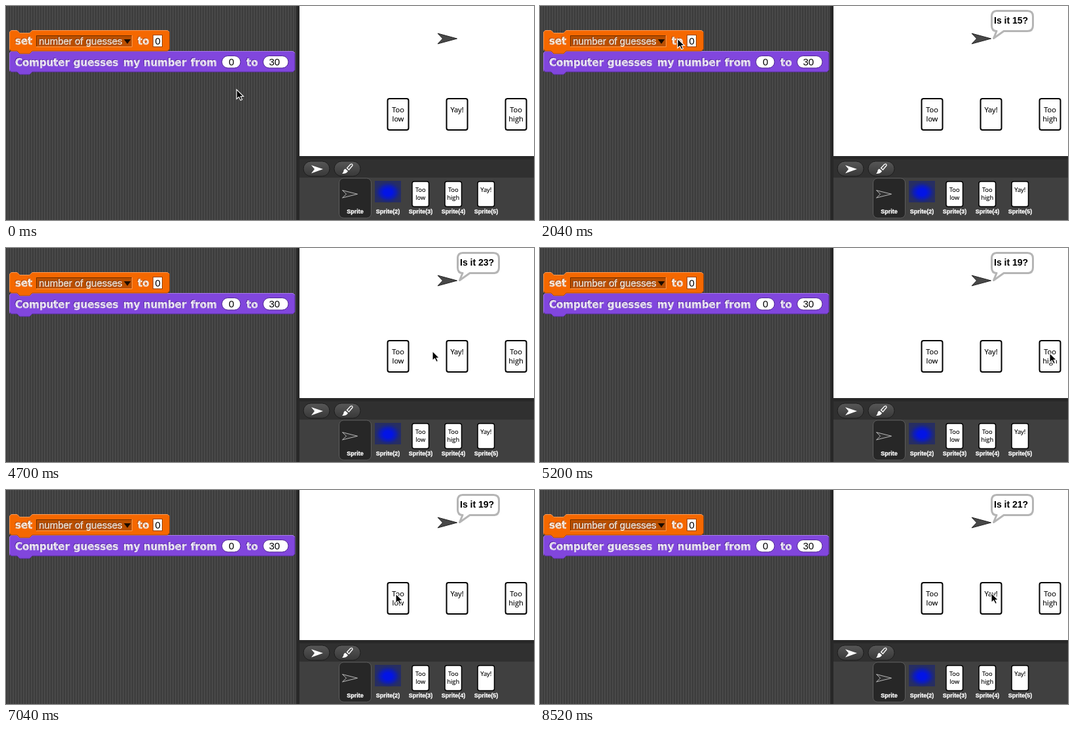
Animation of 806 by 328 pixels, one loop 8540 ms. Source, as an HTML page:

```html
<!DOCTYPE html>
<html lang="en">
<head>
<meta charset="utf-8">
<title>Number guessing game</title>
<style>
  html, body { margin: 0; width: 100%; height: 100%; overflow: hidden; background: #282828; }
  svg { display: block; width: 806px; height: 328px; }
  text { white-space: pre; }
  .label { font: bold 15px "DejaVu Sans", Verdana, sans-serif; fill: #fff; stroke: #fff; stroke-width: .35px; }
  .orange { text-shadow: -1px -1px 0 #b04a00; }
  .purple { text-shadow: -1px -1px 0 #5a2da0; }
  .field { font: 15px "Liberation Sans", Arial, sans-serif; }
  .variable { fill: #fff; stroke: #fff; stroke-width: .35px; text-shadow: -1px -1px 0 #803600; }
  .card { font: 11px "Open Sans", "Noto Sans", sans-serif; fill: #000; stroke: #000; stroke-width: .15px; text-anchor: middle; }
  .mini { font-size: 9.3px; }
  .name { font: bold 9px "Liberation Sans", Arial, sans-serif; fill: #fff; stroke: #fff; stroke-width: .3px; text-anchor: middle; }
  .speech { font: bold 14px "Liberation Sans", Arial, sans-serif; }
</style>
</head>
<body>
<svg viewBox="0 0 806 328">
  <defs>
    <pattern id="stripes" width="4" height="4" patternUnits="userSpaceOnUse">
      <rect width="4" height="4" fill="#494949"/>
      <rect width="2" height="4" fill="#3c3c3c"/>
    </pattern>
    <radialGradient id="blur">
      <stop offset=".3" stop-color="#0214e6"/>
      <stop offset=".6" stop-color="#0c1cbc" stop-opacity=".85"/>
      <stop offset="1" stop-color="#1c2778" stop-opacity="0"/>
    </radialGradient>
    <linearGradient id="button" x2="0" y2="1">
      <stop stop-color="#575757"/>
      <stop offset="1" stop-color="#383838"/>
    </linearGradient>
  </defs>

  <!-- Panels -->
  <rect width="806" height="328" fill="#282828"/>
  <rect width="443" height="328" fill="url(#stripes)"/>
  <rect x="448" width="358" height="230" fill="#fff"/>
  <rect x="448" y="235" width="358" height="28" fill="#303030"/>
  <rect x="448" y="263" width="358" height="65" fill="#404040"/>

  <!-- Script blocks -->
  <g id="blocks"></g>
  <g class="label orange">
    <text x="14" y="59">set</text>
    <text x="201" y="59">to</text>
  </g>
  <rect x="46" y="45" width="147" height="18" fill="#ba4f00"/>
  <path d="M46.500 63V45.500H193" fill="none" stroke="#6f2f00"/>
  <path d="M46 62.500H192.500V45" fill="none" stroke="#ff9a4d"/>
  <text class="field variable" x="50" y="59">number of guesses</text>
  <path d="M180 51H190.500L185.250 58Z" fill="#1c0c00"/>
  <rect x="224.500" y="44.500" width="14" height="18" fill="#fff" stroke="#9a4300"/>
  <text class="field" x="227.500" y="59">0</text>
  <g class="label purple">
    <text x="14" y="92">Computer</text>
    <text x="103" y="92">guesses</text>
    <text x="179" y="92">my</text>
    <text x="210" y="92">number</text>
    <text x="282" y="92">from</text>
    <text x="367" y="92">to</text>
  </g>
  <g fill="#fff" stroke="#4d2590">
    <rect x="329.500" y="76.500" width="28.500" height="18.500" rx="9.250"/>
    <rect x="392.500" y="76.500" width="38.500" height="18.500" rx="9.250"/>
  </g>
  <text class="field" x="340" y="91">0</text>
  <text class="field" x="401.500" y="91">30</text>

  <!-- Stage -->
  <path d="M659 42L688.500 50L659 58L666.500 50Z" fill="#484848" stroke="#222"/>
  <g id="cards"></g>
  <g id="bubble">
    <path d="M697 7.500H744Q752.500 7.500 752.500 16V30Q752.500 38.500 744 38.500H708L692.500 49.500L697 38.500Q689.500 38.500 689.500 30V16Q689.500 7.500 697 7.500Z"
      fill="#fff" stroke="#b5b5b5" stroke-width="3" stroke-linejoin="round"/>
    <text id="speech" class="speech" x="693" y="27"></text>
  </g>

  <!-- Sprite list -->
  <g fill="url(#button)" stroke="#1d1d1d">
    <rect x="454" y="238" width="40" height="23" rx="11.500"/>
    <rect x="501" y="238" width="40" height="23" rx="11.500"/>
  </g>
  <path d="M466 244L484 250L466 256.500L471 250Z" fill="#fff"/>
  <path d="M520.500 248.500L526 242.500Q529 241 529 244.500L523.500 251Z" fill="#555" stroke="#fff" stroke-width="1.300"/>
  <path d="M518 249.500L522 253Q520 257.500 513 257Q515.500 255 515.500 252Q516 250 518 249.500Z" fill="#fff"/>
  <rect x="508.500" y="264" width="49" height="61" rx="7" fill="#272727" stroke="#5c5c5c"/>
  <path d="M513.500 282.500L536.500 288.300L513.500 294L519.500 288.300Z" fill="#303030" stroke="#ddd" stroke-width=".8"/>
  <rect x="563" y="268" width="40" height="33" fill="#272e62"/>
  <ellipse cx="583" cy="285.500" rx="21" ry="17" fill="url(#blur)"/>
  <g id="minis"></g>
  <g id="names"></g>

  <path id="cursor" d="M0 0V14.500L3.500 11.300L6 16.500L8.500 15.500L6.200 10.500H10.500Z" fill="#000" stroke="#fff" stroke-width="1.100"/>
</svg>
<script>
const $ = id => document.getElementById(id);
const LOOP = 8540;

function block(y, right, fill, light, dark) {
  const top = `M5.5 ${y + 31}V${y + 3}L8 ${y + .5}H17L21 ${y + 4.5}H36L40 ${y + .5}H${right - 3}L${right} ${y + 3}`;
  const bottom = `V${y + 29}L${right - 3} ${y + 32}H40L36 ${y + 36}H21L17 ${y + 32}H8L5.5 ${y + 29}`;
  return `<path d="${top}${bottom}Z" fill="${fill}"/>
    <path d="${top}" fill="none" stroke="${light}"/>
    <path d="M${right} ${y + 3}${bottom}" fill="none" stroke="${dark}"/>`;
}

function card(x, y, w, h, words, mini) {
  const first = y + (mini ? 16 : 20.5), step = mini ? 11.5 : 14.5;
  const lines = words.split(' ').map((word, i) =>
    `<text class="card ${mini ? 'mini' : ''}" x="${x + w / 2}" y="${first + i * step}">${word}</text>`);
  return `<rect x="${x}" y="${y}" width="${w}" height="${h}" rx="3" fill="#fff" stroke="#000" stroke-width="${mini ? 1.5 : 2}"/>` + lines.join('');
}

$('blocks').innerHTML =
  block(69, 441, '#8146dd', '#a67bea', '#5b30a0') +
  block(37, 249.5, '#f56800', '#ff9c55', '#ad4900');
$('cards').innerHTML = ['Too low', 'Yay!', 'Too high']
  .map((words, i) => card(582.5 + 90 * i, 142, 32, 48, words)).join('');
$('minis').innerHTML = ['Too low', 'Too high', 'Yay!']
  .map((words, i) => card(620 + 50 * i, 269, 25.5, 38.5, words, true)).join('');
$('names').innerHTML = [1, 2, 3, 4, 5].map(n =>
  `<text class="name" x="${483 + 50 * n}" y="318">Sprite${n > 1 ? `(${n})` : ''}</text>`).join('');

// Cursor journeys: start time, end time, destination
const home = [352, 128];
const moves = [
  [1000, 1240, 210, 50],
  [2040, 2360, 595, 157],
  [4480, 5080, 778, 161],
  [6380, 7040, 595, 159],
  [7300, 7800, 689, 158]
];
// Each click asks a new question
const guesses = [[1760, 15], [3400, 23], [5140, 19], [7100, 21]];

const ease = u => u * u * (3 - 2 * u);

function cursorAt(t) {
  let [x, y] = home;
  for (const [start, end, toX, toY] of moves) {
    if (t <= start) break;
    const k = ease(Math.min(1, (t - start) / (end - start)));
    x += (toX - x) * k;
    y += (toY - y) * k;
  }
  return [x, y];
}

function render(t) {
  const [x, y] = cursorAt(t).map(Math.round);
  $('cursor').setAttribute('transform', `translate(${x} ${y})`);
  const asked = guesses.filter(([time]) => t >= time).pop();
  $('bubble').setAttribute('visibility', asked ? 'visible' : 'hidden');
  $('speech').textContent = asked ? `Is it ${asked[1]}?` : '';
}

const began = performance.now();
function tick() {
  render((performance.now() - began) % LOOP);
  requestAnimationFrame(tick);
}
tick();
</script>
</body>
</html>
```
